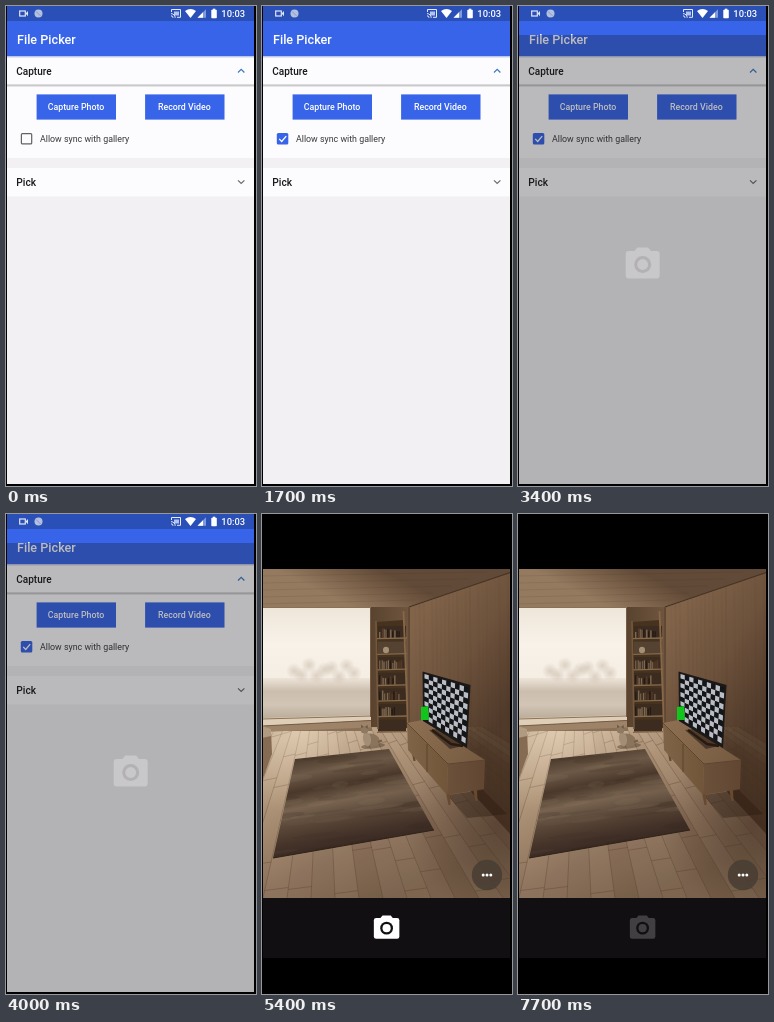
Recreate the animation shown at these times as an HTML page with a canvas. Size 250 by 480 pixels, loop 8000 ms.

```html
<!DOCTYPE html>
<html lang="en">
<head>
<meta charset="utf-8">
<title>File Picker</title>
<style>
html, body { margin: 0; width: 250px; height: 480px; overflow: hidden; background: #000; }
canvas { display: block; }
</style>
</head>
<body>
<canvas id="stage" width="250" height="480"></canvas>
<script>
const ctx = document.getElementById('stage').getContext('2d');
const LOOP = 8000;
const TIMES = { check: 700, launch: 3400, splash: 4400, camera: 5400, shutter: 7100 };

function rect(x, y, w, h, fill) {
  ctx.fillStyle = fill;
  ctx.fillRect(x, y, w, h);
}

function trace(points) {
  ctx.beginPath();
  for (let i = 0; i < points.length; i += 2) ctx.lineTo(points[i], points[i + 1]);
}

function poly(points, fill) {
  trace(points);
  ctx.closePath();
  ctx.fillStyle = fill;
  ctx.fill();
}

function line(points, color, width = 1) {
  trace(points);
  ctx.strokeStyle = color;
  ctx.lineWidth = width;
  ctx.stroke();
}

function ellipse(x, y, rx, ry, fill, angle = 0) {
  ctx.beginPath();
  ctx.ellipse(x, y, rx, ry, angle, 0, Math.PI * 2);
  ctx.fillStyle = fill;
  ctx.fill();
}

function rounded(x, y, w, h, r, fill) {
  ctx.beginPath();
  ctx.roundRect(x, y, w, h, r);
  ctx.fillStyle = fill;
  ctx.fill();
}

function gradient(x0, y0, x1, y1, ...colors) {
  const g = ctx.createLinearGradient(x0, y0, x1, y1);
  colors.forEach((c, i) => g.addColorStop(i / (colors.length - 1), c));
  return g;
}

function glow(x, y, r, rgb, alpha) {
  const g = ctx.createRadialGradient(x, y, 0, x, y, r);
  g.addColorStop(0, `rgba(${rgb},${alpha})`);
  g.addColorStop(1, `rgba(${rgb},0)`);
  rect(x - r, y - r, 2 * r, 2 * r, g);
}

function text(value, x, y, size, weight, color) {
  ctx.font = `${weight} ${size}px Roboto, sans-serif`;
  ctx.fillStyle = color;
  ctx.fillText(value, x, y);
}

function randomizer(seed) {
  return () => (seed = seed * 16807 % 2147483647) / 2147483647;
}

function cameraIcon(cx, cy, width, color, hole) {
  ctx.save();
  ctx.translate(cx, cy);
  ctx.scale(width / 34, width / 34);
  rounded(-17, -12, 34, 27.5, 3, color);
  poly([-9, -11, -5.5, -15.5, 5.5, -15.5, 9, -11], color);
  ellipse(0, 1.5, 8.5, 8.5, hole);
  ellipse(0, 1.5, 5.4, 5.4, color);
  ctx.restore();
}

function statusBar() {
  rect(0, 0, 250, 15, '#2a50b8');
  const pale = '#dfe6f8';
  ctx.strokeStyle = pale;
  ctx.lineWidth = 1.2;
  ctx.strokeRect(13.7, 5, 5.6, 5);
  poly([19.5, 7.5, 22, 5, 22, 10.3], pale);
  ellipse(32.5, 7.5, 4, 4, '#b4c0df');
  line([30, 5.4, 34.7, 10.1], '#7c90c8', .8);

  line([165.5, 6, 165.5, 3.5, 174.5, 3.5, 174.5, 11.3, 171, 11.3], '#e6ecfa');
  rect(168, 5.5, 5, 4, '#b3c3ea');
  for (const r of [2, 4.2]) {
    ctx.beginPath();
    ctx.arc(165, 11.8, r, -Math.PI / 2, 0);
    ctx.stroke();
  }
  ctx.beginPath();
  ctx.moveTo(184.5, 12);
  ctx.lineTo(179, 5);
  ctx.quadraticCurveTo(184.5, 1, 190, 5);
  ctx.fillStyle = '#fff';
  ctx.fill();
  poly([191.5, 11.7, 200, 11.7, 200, 3.2], '#7f9be0');
  poly([191.5, 11.7, 197, 11.7, 197, 6.2], '#fff');
  rounded(205.3, 3.7, 5.5, 8.5, .7, '#fff');
  rect(206.8, 2.7, 2.5, 1.5, '#fff');
  text('10:03', 215.3, 11, 9.4, 500, '#fff');
}

function button(label, x, textX) {
  rect(x - .4, 88.4, 79.4, 25.2, '#3764e8');
  text(label, textX, 104, 8.8, 500, '#fff');
}

function pickerPage(checked) {
  rect(0, 0, 250, 480, '#f2f0f3');
  rect(0, 50, 250, 102, '#fcfbfd');
  rect(0, 162, 250, 28.5, '#fcfbfd');
  rect(0, 15, 250, 35, '#3764e8');
  rect(0, 50, 250, 2, gradient(0, 50, 0, 52, '#a9b7e0', '#f5f5fa'));
  rect(0, 78, 250, 3, gradient(0, 78, 0, 81, '#e3e2e4', '#c9c8cb', '#f3f2f4'));
  statusBar();
  text('File Picker', 11, 37.7, 12.6, 500, '#fff');
  text('Capture', 10.3, 68.6, 10, 500, '#19181b');
  text('Pick', 10.3, 180, 10.2, 500, '#19181b');
  line([232, 66.5, 235.2, 63.3, 238.4, 66.5], '#3b7ac8', 1.2);
  line([232, 174.3, 235.2, 177.5, 238.4, 174.3], '#6b6a6d', 1.2);
  button('Capture Photo', 31, 41.7);
  button('Record Video', 139.5, 152);

  if (checked) {
    rounded(14.8, 127, 11.5, 11.5, 1.5, '#3764e8');
    line([17.2, 132.9, 19.7, 135.5, 24.2, 130.2], '#fff', 1.3);
  } else {
    ctx.strokeStyle = '#626164';
    ctx.lineWidth = 1.2;
    ctx.beginPath();
    ctx.roundRect(15.4, 127.6, 10.3, 10.3, 1);
    ctx.stroke();
  }
  text('Allow sync with gallery', 34, 136.3, 8.85, 400, '#39383b');
}

function splash(offset, alpha) {
  ctx.save();
  ctx.globalAlpha = alpha;
  ctx.translate(0, offset);
  rect(0, 0, 250, 459, '#1b191c');
  rect(0, 459, 250, 30, '#000');
  ctx.restore();
  const see = alpha < 1;
  cameraIcon(124.7, 228 + offset, 34, see ? '#c8c7c9' : '#747376', see ? '#b3b1b4' : '#1b191c');
}

// Floor boards converge on one vanishing point.
function floor() {
  const vx = 61, vy = 117;
  const at = (k, y) => vx + (k * 24 - 12) * (y - vy) / 267;
  poly([0, 216, 147, 211, 250, 322, 250, 385, 0, 385],
    gradient(50, 212, 130, 385, '#cbb398', '#a88d72', '#8a705a', '#755d49'));
  const rnd = randomizer(91);
  for (let k = -16; k < 20; k++) {
    const tone = rnd() < .5 ? '255,230,195' : '70,45,25';
    poly([at(k, 213), 213, at(k + 1, 213), 213, at(k + 1, 385), 385, at(k, 385), 385],
      `rgba(${tone},${rnd() * .06})`);
    line([at(k, 213), 213, at(k, 385), 385], 'rgba(70,48,32,.32)', .8);
    for (let y = 218 + rnd() * 25; y < 385; y += 30 + rnd() * 50) {
      line([at(k, y), y, at(k + 1, y - 3), y - 3], 'rgba(70,48,32,.35)', .8);
    }
  }
  glow(40, 216, 85, '255,240,215', .35);
  glow(235, 310, 90, '50,32,20', .45);
}

function windowWall() {
  rect(0, 93, 110, 124, '#8a7056');
  rect(0, 94, 109, 111, gradient(0, 94, 0, 205, '#efe6da', '#f8f2e9', '#f5ede2', '#ddd1c2'));
  for (let i = 0; i < 9; i++) {
    glow(32 + i * 7.5, 157 + Math.sin(i * 2.4) * 6, 8, '180,163,143', .4);
  }
  rect(0, 164, 109, 40, gradient(0, 164, 0, 204, 'rgba(205,192,176,.2)', '#cbbeae', '#d2c5b5', '#bcad9b'));
  poly([0, 204, 109, 201, 118, 206, 0, 212], '#dfceb7');
  poly([0, 212, 118, 206, 118, 213, 0, 218], '#9d8368');
  line([0, 205, 109, 202], '#8d745b');
  line([0, 212, 118, 206], '#755c45');
  rect(108, 94, 1.5, 109, '#745b43');
}

function bookshelf() {
  rect(109, 93, 39, 120, gradient(109, 0, 148, 0, '#59432f', '#705640'));
  poly([114, 108, 142, 106, 146, 214, 116, 215], '#45321f');
  const rnd = randomizer(37);
  for (let row = 0; row < 7; row++) {
    const y = 124 + row * 15.6;
    rect(116, y - 12, 28, 12, row === 1 ? '#564230' : '#3c2b1f');
    if (row !== 1 && row < 6) {
      for (let x = 117; x < 139 - (row % 2) * 5; x += 1.5 + rnd() * 1.5) {
        const h = 6 + rnd() * 4;
        rect(x, y - h, 1.4, h, ['#6f5b46', '#241b15', '#543828', '#7d6951'][Math.floor(rnd() * 4)]);
      }
    }
    line([115, y + .7, 145, y], '#876a4c', 1.3);
  }
  ellipse(124, 136, 3, 3.2, '#a58f75');
  line([114, 107, 116, 215], '#73583e', 1.6);
  line([141.5, 97, 146, 214], '#866747', 1.8);
}

function rug() {
  ctx.save();
  trace([33, 245, 127, 235, 172, 316, 11, 344]);
  ctx.closePath();
  ctx.clip();
  rect(0, 230, 180, 120, gradient(70, 238, 88, 335,
    '#4b3a2c', '#6d5947', '#4a382b', '#77634f', '#5a4738', '#46342a', '#352720'));
  const rnd = randomizer(53);
  for (let i = 0; i < 60; i++) {
    const tone = rnd() < .5 ? '150,130,108' : '35,23,17';
    ellipse(rnd() * 175, 237 + rnd() * 108, 8 + rnd() * 20, 1 + rnd() * 2.5,
      `rgba(${tone},${.04 + rnd() * .1})`, -.13);
  }
  ctx.restore();
  line([11, 344, 172, 316], '#30221a', 1.2);
}

function cat() {
  ellipse(111, 232, 12, 2.5, 'rgba(60,42,28,.4)', -.08);
  ellipse(110, 226, 8, 6.2, '#8b745c', .35);
  ellipse(105, 225, 4, 7, '#a38d74', -.15);
  ellipse(102.5, 216, 3.7, 3.6, '#8f7960', 0);
  poly([99, 214, 99, 210.5, 102, 213], '#6f5a45');
  poly([103, 213, 105.5, 210.8, 106, 215], '#6f5a45');
  line([116, 228, 120, 226.5], '#755e47', 2);
}

function cabinet() {
  poly([147, 236, 186, 281, 221, 276, 245, 300, 205, 304], 'rgba(40,25,15,.4)');
  for (const [x, y] of [[149, 235], [184, 279], [211, 275]]) {
    poly([x, y, x + 4, y, x + 4.5, y + 12, x + 2.5, y + 12], '#66492f');
  }
  poly([145, 209, 186, 250, 185, 281, 146, 236], gradient(145, 0, 187, 0, '#806448', '#715539'));
  poly([186, 250, 223, 246, 222, 275, 185, 281], gradient(186, 0, 223, 0, '#6b503a', '#614732'));
  poly([145, 209, 160, 206, 223, 246, 186, 250], gradient(150, 206, 215, 250, '#8d7052', '#775b41'));
  line([145, 209, 186, 250, 223, 246], '#5d432d', .8);
  line([165, 230, 165, 258], '#553d29', .8);
}

function television() {
  poly([167, 216, 183, 214, 205, 231, 188, 235], 'rgba(35,23,15,.55)');
  line([170, 216, 189, 230, 201, 232], '#261b14', 2.5);
  poly([160.5, 157.5, 208.5, 171, 205, 234, 161, 207], '#1b1818');
  const point = (u, v) => {
    const x = 162.5 + 44 * u - 3 * u * v;
    const y = 160 + 13.5 * u + v * (45 + 11 * u);
    return [x, y];
  };
  const cols = 10, rows = 10;
  for (let r = 0; r < rows; r++) {
    for (let c = 0; c < cols; c++) {
      const u = c / cols, v = r / rows, du = 1 / cols, dv = 1 / rows;
      poly([...point(u, v), ...point(u + du, v), ...point(u + du, v + dv), ...point(u, v + dv)],
        (r + c) % 2 ? '#141517' : '#b9bdc6');
    }
  }
  poly([159, 193, 166, 192, 167, 206, 159, 206], '#12c51c');
}

function room() {
  ctx.save();
  ctx.beginPath();
  ctx.rect(1, 55, 247, 329);
  ctx.clip();
  poly([0, 55, 250, 55, 250, 59, 147, 93, 0, 93],
    gradient(90, 93, 110, 52, '#947a5f', '#7b614a', '#614a37'));
  for (let i = 0; i < 5; i++) {
    line([0, 62 + i * 7, 225 - i * 18, 58 + i * 7], 'rgba(60,42,27,.1)', 1.2);
  }
  poly([147, 93, 250, 58, 250, 324, 147, 211],
    gradient(147, 120, 250, 190, '#806349', '#6d523c', '#503a2a'));
  const rnd = randomizer(17);
  for (let i = 0; i < 24; i++) {
    const x = 149 + i * 4.2;
    line([x, 94 - (x - 147) * .34, x + 2, 211 + (x - 147) * 1.08],
      `rgba(58,39,24,${rnd() * .05})`, 2);
  }
  line([147, 93, 250, 58], 'rgba(45,30,20,.55)', 1.2);
  floor();
  windowWall();
  bookshelf();
  line([147, 93, 147, 211], '#4d3826', .8);
  poly([0, 214, 9, 216, 10, 240, 0, 267], '#856b52');
  poly([0, 212, 9, 215, 9, 222, 0, 224], '#b09a80');
  rug();
  cat();
  cabinet();
  television();
  ctx.restore();
}

function cameraPage(pressed) {
  rect(0, 0, 250, 480, '#000');
  room();
  rect(0, 384, 250, 60, '#110f12');
  cameraIcon(124.6, 413, 25.5, pressed ? '#413f42' : '#fff', '#110f12');
  ellipse(225, 361, 15.2, 15.2, 'rgba(72,60,51,.85)');
  for (const x of [221.2, 225, 228.8]) ellipse(x, 361, 1.5, 1.5, '#fff');
}

function draw(t) {
  if (t >= TIMES.camera) {
    cameraPage(t >= TIMES.shutter);
  } else if (t >= TIMES.splash) {
    splash(0, 1);
    rect(0, 459, 250, 21, '#000');
  } else {
    pickerPage(t >= TIMES.check);
    if (t >= TIMES.launch) splash(29, .29);
  }
  rect(0, 0, 1, 480, '#000');
  rect(248, 0, 2, 480, '#000');
  rect(0, 478, 250, 2, '#000');
}

const start = performance.now();
function tick() {
  draw((performance.now() - start) % LOOP);
  requestAnimationFrame(tick);
}
tick();
</script>
</body>
</html>
```
